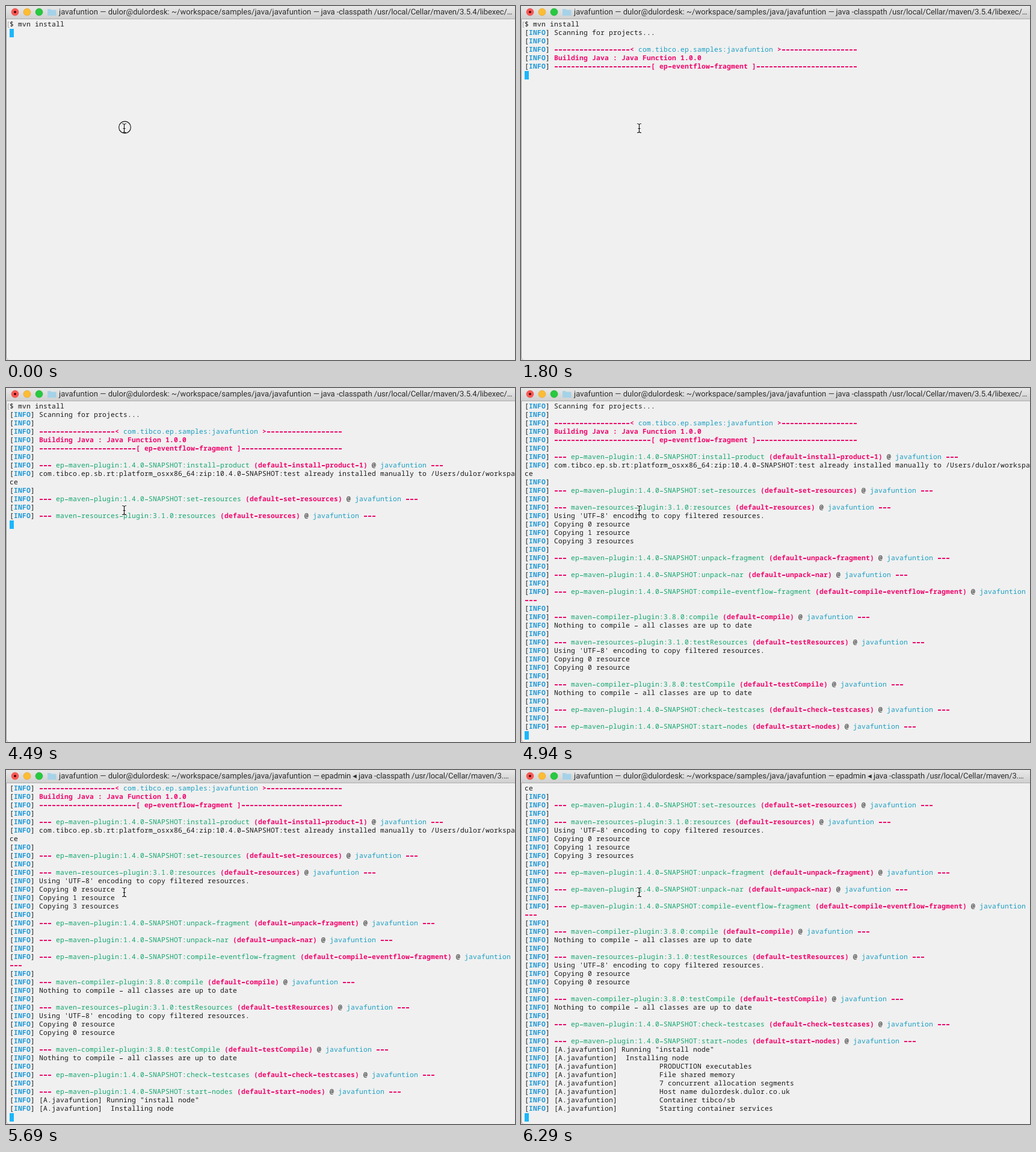
Recreate the animation shown at these times as an HTML page. Size 846 by 588 pixels, loop 8 s.

```html
<!DOCTYPE html>
<html lang="en">
<head>
<meta charset="utf-8">
<title>Terminal</title>
<style>
html, body { margin: 0; width: 846px; height: 588px; overflow: hidden; background: #ddd; }
#win { position: absolute; inset: 0; background: #f0f0f0; border-left: 1px solid #999; border-bottom-left-radius: 5px; }
#bar { position: absolute; left: 0; top: 0; width: 846px; height: 21px;
  background: linear-gradient(#e8e8e8, #d0d0d0); border-bottom: 1px solid #aeaeae; }
#bar span { position: absolute; top: 0; white-space: pre; color: #2b2b2b;
  font: 13px/22px Roboto, Inter, sans-serif; text-rendering: geometricPrecision; }
#place { left: 88px; letter-spacing: .06px; }
#job { left: 523.5px; letter-spacing: -.09px; }
#icons { position: absolute; left: 0; top: 0; }
#term { position: absolute; left: 6px; top: 24px; color: #1a1a1a; white-space: pre;
  font: 500 11.3px/14px "Noto Sans Mono", "DejaVu Sans Mono", monospace; text-rendering: geometricPrecision;
  font-variant-ligatures: none; }
#term div { height: 14px; }
#term b { color: #f0056c; }
#term .info { color: #1c98d6; }
#term .goal { color: #14a66f; }
#term .name { color: #1a9fc2; }
/* wide terminal dashes */
#term i { --thick: 1px; --y: 7px; display: inline-block; height: 14px; vertical-align: top; font-style: normal;
  -webkit-text-fill-color: transparent;
  background: linear-gradient(90deg, #0000 1px, currentColor 1px 6px, #0000 6px) 0 var(--y) / 7px var(--thick) repeat-x; }
#term b i { --thick: 2px; --y: 6px; }
#cursor { position: absolute; left: 6px; width: 7px; height: 14px; background: #1ab7fb; }
</style>
</head>
<body>
<div id="win"></div>
<div id="bar"><span id="place">javafuntion — dulor@dulordesk: ~/workspace/samples/java/javafuntion —</span><span id="job"></span></div>
<div id="term"></div>
<div id="cursor"></div>
<svg id="icons" width="846" height="588" fill="none">
  <defs>
    <path id="beam" d="M193 195.500q3 0 3.500 1.500q.500-1.500 3.500-1.500M196.500 197v12M193 210.500q3 0 3.500-1.500q.500 1.500 3.500 1.500M194.500 203.500h4"/>
  </defs>
  <g stroke-width=".6">
    <circle cx="15" cy="10" r="6" fill="#fc5753" stroke="#df4744"/>
    <circle cx="35" cy="10" r="6" fill="#fdbc32" stroke="#de9f34"/>
    <circle cx="55" cy="10" r="6" fill="#27c93f" stroke="#20aa33"/>
  </g>
  <circle cx="15" cy="10" r="2" fill="#4a0505"/>
  <path d="M69 5h5l1.500 1.500h8V16H69z" fill="#a5d2e8"/>
  <path id="mark" d="M5.500 26.500h-2v9h2" stroke="#aaa"/>
  <use href="#beam" stroke="#fff" stroke-width="2.600"/>
  <use href="#beam" stroke="#111" stroke-width="1.200"/>
  <circle id="click" cx="197.500" cy="201.500" r="9.900" stroke="#111" stroke-width="1.100"/>
</svg>
<script>
const $ = id => document.getElementById(id);
const term = $('term');

const hot = s => `<b>${s}</b>`;
const tint = (kind, s) => `<span class="${kind}">${s}</span>`;
const info = (s = '') => `[<b class="info">INFO</b>] ${s}`;
const node = s => info('[A.javafuntion] ' + s);
const detail = s => node(' '.repeat(9) + s);
const dashes = n => '-'.repeat(n);

// A blank line, then the header of one plugin goal
const goal = (plugin, id, run = id, end = ' ' + hot('---')) => [info(), info(
  `${hot('---')} ${tint('goal', `${plugin}:${id}`)} ${hot(`(default-${run})`)} @ ${tint('name', 'javafuntion')}${end}`)];
const ep = (...args) => goal('ep-maven-plugin:1.4.0-SNAPSHOT', ...args);
const resources = id => goal('maven-resources-plugin:3.1.0', id);
const compiler = id => goal('maven-compiler-plugin:3.8.0', id);
const encoding = info("Using 'UTF-8' encoding to copy filtered resources.");
const upToDate = info('Nothing to compile - all classes are up to date');
const copying = n => info(`Copying ${n} resource${n > 1 ? 's' : ''}`);

const lines = [
  '$ mvn install',
  info('Scanning for projects...'),
  info(),
  info(hot(dashes(18) + '&lt; ') + tint('name', 'com.tibco.ep.samples:javafuntion') + hot(' &gt;' + dashes(18))),
  info(hot('Building Java : Java Function 1.0.0')),
  info(hot(`${dashes(23)}[ ep-eventflow-fragment ]${dashes(24)}`)),
  ...ep('install-product', 'install-product-1'),
  info('com.tibco.ep.sb.rt:platform_osxx86_64:zip:10.4.0-SNAPSHOT:test already installed manually to /Users/dulor/workspa'),
  'ce',
  ...ep('set-resources'),
  ...resources('resources'),
  encoding, copying(0), copying(1), copying(3),
  ...ep('unpack-fragment'),
  ...ep('unpack-nar'),
  ...ep('compile-eventflow-fragment', undefined, ''),
  hot('---'),
  ...compiler('compile'),
  upToDate,
  ...resources('testResources'),
  encoding, copying(0), copying(0),
  ...compiler('testCompile'),
  upToDate,
  ...ep('check-testcases'),
  ...ep('start-nodes'),
  node('Running "install node"'),
  node(' Installing node'),
  detail('PRODUCTION executables'),
  detail('File shared memory'),
  detail('7 concurrent allocation segments'),
  detail('Host name dulordesk.dulor.co.uk'),
  detail('Container tibco/sb'),
  detail('Starting container services')
].map(s => `<div>${s.replace(/-+/g, '<i>$&</i>')}</div>`);

const LOOP = 8000, ROWS = 39;
// [start in ms, lines printed]
const prints = [[0, 1], [750, 2], [1800, 6], [2390, 8], [4490, 14], [4640, 27],
  [4940, 40], [5090, 42], [5990, 45], [6290, 48]];
const path = 'java -classpath /usr/local/Cellar/maven/3.';
const jobs = [[0, path + '5.4/libexec/…'], [5240, `epadmin ◂ ${path}…`],
  [5540, `bash ◂ ${path}5.4…`], [5690, `epadmin ◂ ${path}…`]];
const at = (steps, t) => steps.findLast(s => s[0] <= t)[1];

// Terminal cells are 7 px wide
term.textContent = '0'.repeat(100);
term.style.letterSpacing = 7 - term.getBoundingClientRect().width / 100 + 'px';

let shown, title;
function draw(t) {
  const count = at(prints, t), job = at(jobs, t);
  if (count !== shown) {
    const top = Math.max(0, count - ROWS);
    term.innerHTML = lines.slice(top, count).join('');
    $('cursor').style.top = 24 + 14 * (count - top) + 'px';
    $('mark').style.display = top ? 'none' : '';
    shown = count;
  }
  if (job !== title) $('job').textContent = title = job;
  $('click').style.display = t < 150 ? '' : 'none';
}

const start = performance.now();
function tick() {
  draw((performance.now() - start) % LOOP);
  requestAnimationFrame(tick);
}
tick();
</script>
</body>
</html>
```
